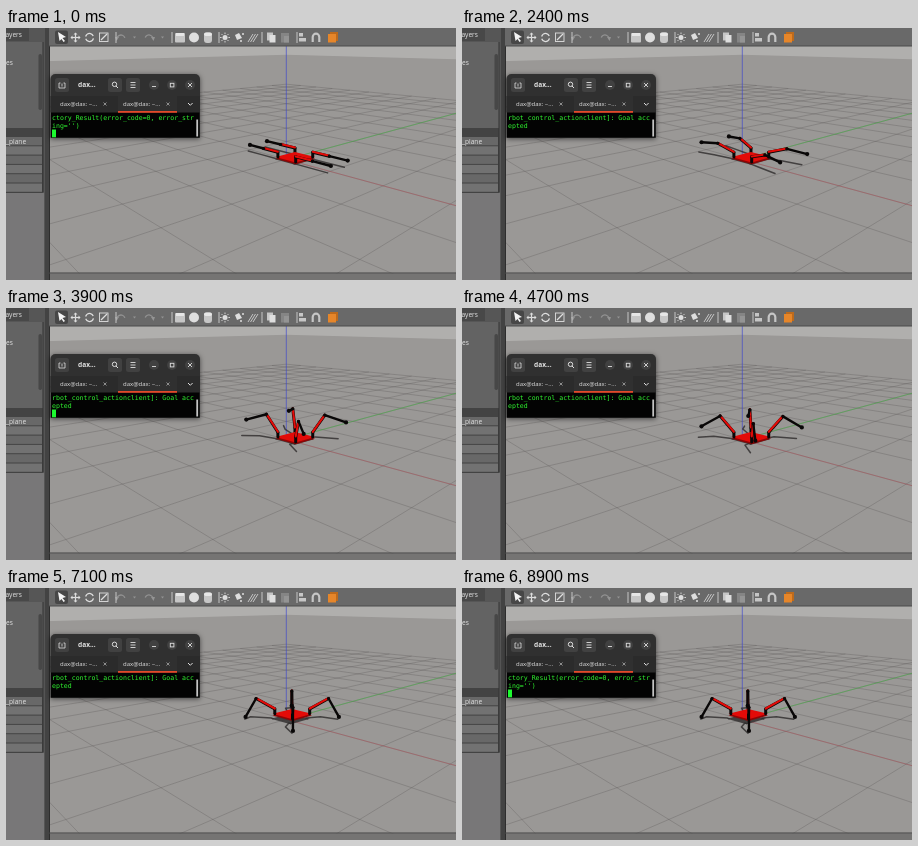
Recreate the animation shown at these times as an HTML page with a canvas. Size 450 by 252 pixels, loop 9000 ms.

```html
<!DOCTYPE html>
<html lang="en">
<head>
<meta charset="utf-8">
<title>Robot simulation</title>
<style>
html, body { margin: 0; width: 100%; height: 100%; overflow: hidden; background: #9a9896; }
#stage { position: relative; width: 450px; height: 252px; overflow: hidden; }
canvas { position: absolute; left: 0; top: 0; }
#stage span { position: absolute; white-space: pre; color: #e4e4e4; font: 6.6px/8px "Open Sans", "Noto Sans", sans-serif; }
#stage .title { font-weight: 700; }
#stage .tab { font-size: 6px; top: 72px; }
#stage .term { left: 46px; color: #30f830; font: 6.55px/8px "DejaVu Sans Mono", monospace; }
</style>
</head>
<body>
<div id="stage">
  <canvas id="view" width="450" height="252"></canvas>
  <span style="left:-4px;top:3px">Layers</span>
  <span style="left:0;top:31px">es</span>
  <span style="left:0;top:110px">_plane</span>
  <span class="title" style="left:72px;top:53px">dax...</span>
  <span class="tab" style="left:54px">dax@dax: ~...</span>
  <span class="tab" style="left:117px">dax@dax: ~...</span>
  <span class="term" id="row1" style="top:86px"></span>
  <span class="term" id="row2" style="top:94px"></span>
</div>
<script>
const ctx = document.getElementById("view").getContext("2d");
const rows = [document.getElementById("row1"), document.getElementById("row2")];
const LOOP = 9000, STEP = 100;

function rect(c, x, y, w, h) { ctx.fillStyle = c; ctx.fillRect(x, y, w, h); }

function round(c, x, y, w, h, r) {
  ctx.fillStyle = c;
  ctx.beginPath();
  ctx.roundRect(x, y, w, h, r);
  ctx.fill();
}

function line(c, w, ...p) {
  ctx.strokeStyle = c;
  ctx.lineWidth = w;
  ctx.beginPath();
  for (let i = 0; i < p.length; i += 2) ctx.lineTo(p[i], p[i + 1]);
  ctx.stroke();
}

function poly(c, ...p) {
  ctx.fillStyle = c;
  ctx.beginPath();
  for (let i = 0; i < p.length; i += 2) ctx.lineTo(p[i], p[i + 1]);
  ctx.fill();
}

function dot(c, x, y, r) {
  ctx.fillStyle = c;
  ctx.beginPath();
  ctx.arc(x, y, r, 0, 7);
  ctx.fill();
}

function ring(c, w, x, y, r, from = 0, to = 7) {
  ctx.strokeStyle = c;
  ctx.lineWidth = w;
  ctx.beginPath();
  ctx.arc(x, y, r, from, to);
  ctx.stroke();
}

const mix = (a, b, k) => a.map((v, i) => v + (b[i] - v) * k);

// Camera at (5, -5, 2) looking at the world origin
const FOCAL = 410, CX = 280.3, CY = 131.5, NEAR = 0.2;
function toCamera([x, y, z]) {
  const a = x - 5, b = y + 5, c = z - 2;
  return [0.7071 * (a + b), 0.1925 * (b - a) + 0.9623 * c, 0.6804 * (b - a) - 0.2722 * c];
}
const toScreen = ([r, u, d]) => [CX + FOCAL * r / d, CY - FOCAL * u / d];
const project = p => toScreen(toCamera(p));

function worldLine(color, width, p, q) {
  let [a, b] = [toCamera(p), toCamera(q)].sort((m, n) => n[2] - m[2]);
  if (a[2] < NEAR) return;
  if (b[2] < NEAR) b = mix(a, b, (a[2] - NEAR) / (a[2] - b[2]));
  line(color, width, ...toScreen(a), ...toScreen(b));
}

function drawWorld() {
  rect("#b0afad", 43, 18, 407, 30);
  const edge = [[-50, 0, 0], [-50, 50, 0], [0, 50, 0]].flatMap(project);
  poly("#9a9896", ...edge, 520, 246, -70, 246);
  const grid = "rgba(82,80,79,.44)";
  for (let i = -10; i <= 10; i++) {
    worldLine(grid, 0.65, [i, -10, 0], [i, 10, 0]);
    worldLine(grid, 0.65, [-10, i, 0], [10, i, 0]);
  }
  worldLine("rgba(190,70,80,.55)", 0.7, [0, 0, 0], [4.9, 0, 0]);
  worldLine("rgba(60,185,60,.6)", 0.8, [0, 0, 0], [0, 10, 0]);
  line("rgba(62,70,205,.75)", 0.9, CX, 18, CX, CY);
}

function drawPanel() {
  rect("#565656", 0, 0, 44, 252);
  rect("#484848", 0, 0, 23, 13);
  rect("#636363", 0, 14, 37, 86);
  round("#474747", 32.5, 26, 3.5, 56, 1.7);
  rect("#434343", 0, 100, 37, 65);
  for (let i = 0; i < 6; i++) rect(i % 2 ? "#727272" : "#686868", 0, 109 + i * 9.3, 36, 8.3);
  rect("#787778", 0, 165, 38, 87);
  rect("#343434", 36.5, 14, 1, 150);
  rect("#434343", 39, 0, 4, 252);
  rect("#2d2d2d", 43, 18, 1, 234);
}

function drawToolbar() {
  const pale = "#dedede", mid = "#c6c6c6", dim = "#949494", y = 9.5;
  rect("#696969", 43, 0, 407, 18);
  rect("#4d4d4d", 43, 17.5, 407, 1);
  round("#474747", 49, 2.5, 13, 13.5, 2);
  poly("#f4f4f4", 52, 4, 60, 9, 56.5, 10, 59, 13, 57.5, 14, 55.5, 11, 53.5, 13);
  for (let i = 0; i < 4; i++) {
    ctx.save();
    ctx.translate(69.5, y);
    ctx.rotate(i * Math.PI / 2);
    line(pale, 1.2, 0, 0, 4, 0);
    poly(pale, 5, 0, 3, -2, 3, 2);
    ctx.restore();
  }
  ring(pale, 1.3, 83.5, y, 4, 0.2, 2.8);
  ring(pale, 1.3, 83.5, y, 4, 3.4, 5.9);
  ctx.strokeStyle = pale;
  ctx.lineWidth = 0.9;
  ctx.strokeRect(93.5, 5, 8.5, 8.5);
  line(pale, 1.3, 95, 12, 101, 6);
  for (const [x, s] of [[115, 1], [143, -1]]) {
    ring(dim, 1.3, x, 11, 4, 3.5, 6);
    poly(dim, x - s * 6, 9, x - s * 2, 9, x - s * 4.5, 13);
    poly(dim, x + 12, 8.5, x + 15, 8.5, x + 13.5, 10.5);
  }
  for (const x of [110, 166, 213, 256, 291]) rect(mid, x - 0.5, 4, 1, 11);
  round(mid, 169, 5, 10, 9.5, 1);
  rect("#e6e6e6", 170, 5, 8, 3);
  dot(pale, 188, y, 5);
  round(mid, 198, 4.5, 8, 10.5, 3);
  round("#e6e6e6", 198, 4.5, 8, 3.5, 2);
  dot(pale, 219, y, 2.5);
  for (let i = 0; i < 8; i++) {
    const c = Math.cos(i * Math.PI / 4), s = Math.sin(i * Math.PI / 4);
    line(pale, 0.9, 219 + 3.4 * c, y + 3.4 * s, 219 + 5 * c, y + 5 * s);
  }
  poly(pale, 229, 7, 233, 5, 236, 10, 231, 12);
  dot(pale, 237, 6, 1);
  dot(pale, 235, 13, 1);
  for (let i = 0; i < 3; i++) line(mid, 1, 242 + i * 2.5, 14, 247 + i * 2.5, 6);
  rect(mid, 261, 4.5, 6, 8);
  rect(pale, 263.5, 7, 6, 7.5);
  rect("#858585", 275, 5, 8, 9.5);
  rect(dim, 278, 8, 5, 6.5);
  rect(mid, 293, 5, 4, 3.5);
  rect(mid, 293, 10, 7, 3.5);
  ring(mid, 2.2, 310, 9, 3.3, Math.PI, 2 * Math.PI);
  for (const x of [306.7, 313.3]) line(mid, 2.2, x, 9, x, 14);
  rect("#bd6a1c", 324, 4, 8, 9);
  rect("#e6862a", 322, 6, 8, 8.5);
}

function cross(x, y, r, c) {
  line(c, 0.9, x - r, y - r, x + r, y + r);
  line(c, 0.9, x + r, y - r, x - r, y + r);
}

function drawTerminal(cursor) {
  const fg = "#dedede";
  ctx.save();
  ctx.shadowColor = "rgba(0,0,0,.55)";
  ctx.shadowBlur = 5;
  ctx.shadowOffsetY = 1;
  round("#303030", 44.5, 46, 149.5, 64, [5, 5, 1, 1]);
  ctx.restore();
  rect("#2b2b2b", 44.5, 68, 149.5, 16.5);
  rect("#303030", 112, 68, 59, 15);
  rect("#030303", 45, 84.5, 148.5, 25);
  rect("#e2492a", 112, 83, 59, 1.8);
  for (const x of [49, 102, 120]) round("#414141", x, 50, 14, 14, 2.5);
  for (const x of [148, 166, 184]) dot("#414141", x, 57, 5);
  line(fg, 0.8, 54.5, 55, 53, 55, 53, 60, 59, 60, 59, 55, 57.5, 55);
  line(fg, 0.8, 56, 58.5, 56, 55.5);
  ring(fg, 1, 108.5, 56.3, 2.2);
  line(fg, 1, 110, 58, 112, 60);
  for (const y of [54.5, 57, 59.5]) line(fg, 0.9, 124.5, y, 129.5, y);
  line(fg, 0.9, 146, 58.5, 150, 58.5);
  ctx.strokeRect(164.3, 55.3, 3.6, 3.6);
  cross(184, 57, 2, fg);
  for (const x of [99, 162]) cross(x, 76, 1.5, "#999");
  line(fg, 1, 182, 75, 184.3, 77.3, 186.6, 75);
  rect("#c5c5c5", 190.3, 91.5, 1.8, 17);
  if (cursor) rect("#1dfa30", 46, 101.5, 4, 7.8);
}

// Time, then hip yaw, thigh pitch and shin pitch in degrees, body offset and body height
const keys = [
  [0, 0, 0, 0, 0.114, 0.045],
  [1800, 0, 0, 0, 0.114, 0.045],
  [3100, 22, 38, -11, 0.114, 0.045],
  [3900, 34, 57, -17, 0.114, 0.045],
  [5200, 45, 46, -38, 0.114, 0.045],
  [5700, 45, 46, -38, 0.114, 0.045],
  [6400, 45, 30, -60, 0.075, 0.105],
  [LOOP, 45, 30, -60, 0.075, 0.105]
];

function poseAt(t) {
  const i = keys.findIndex(k => k[0] > t);
  const a = keys[i - 1], b = keys[i];
  return mix(a, b, (t - a[0]) / (b[0] - a[0])).slice(1);
}

const RED = "#e30b08", BLACK = "#090707", SHADE = "rgba(45,43,43,.8)";
const THIGH = 0.38, SHIN = 0.39, HALF = 0.25, HIP = 0.22, POST = 0.09;
const rad = d => d * Math.PI / 180;
const shadow = ([x, y, z]) => project([x - 0.5 * z / 0.9, y + 0.1 * z / 0.9, 0]);

function reach([x, y, z], yaw, pitch, len) {
  const flat = len * Math.cos(pitch);
  return [x + flat * Math.cos(yaw), y + flat * Math.sin(yaw), z + len * Math.sin(pitch)];
}

// sx, sy pick the body corner the leg grows from
function makeLeg(sx, sy, [yaw, thigh, shin, c, z]) {
  const turn = Math.atan2(sy * Math.sin(rad(yaw)), sx * Math.cos(rad(yaw)));
  const base = [c + sx * HIP, c + sy * HIP, z];
  const hip = [base[0], base[1], z + POST];
  const knee = reach(hip, turn, rad(thigh), THIGH);
  return [base, hip, knee, reach(knee, turn, rad(shin), SHIN)];
}

function drawLeg(leg) {
  const [base, hip, knee, foot] = leg.map(project);
  line(BLACK, 3, ...base, ...hip);
  line(BLACK, 3, ...hip, ...knee);
  line(RED, 2.1, hip[0], hip[1] - 0.4, knee[0], knee[1] - 0.4);
  line(BLACK, 2.4, ...knee, ...foot);
  dot(BLACK, ...knee, 1.6);
  dot(BLACK, ...foot, 2.1);
}

function drawRobot(pose) {
  const [, , , c, z] = pose;
  const corners = [[-1, -1], [-1, 1], [1, 1], [1, -1]];
  const legs = corners.map(([sx, sy]) => makeLeg(sx, sy, pose));
  const plate = h => corners.map(([sx, sy]) => [c + sx * HALF, c + sy * HALF, h]);
  const [left, back, right, front] = legs;
  ctx.lineCap = ctx.lineJoin = "round";
  poly(SHADE, ...plate(z).flatMap(shadow));
  for (const leg of legs) line(SHADE, 1.5, ...leg.flatMap(shadow));
  drawLeg(back);
  poly("#8e0505", ...plate(z - 0.03).flatMap(project));
  poly(RED, ...plate(z).flatMap(project));
  [left, right, front].forEach(drawLeg);
  ctx.lineCap = "butt";
  ctx.lineJoin = "miter";
}

const RESULT = ["ctory_Result(error_code=0, error_str", "ing='')"];
const ANGLES = ["-60.88084274376154", "82.8192442105417"];
const GOAL = ["rbot_control_actionclient]: Goal acc", "epted"];

function linesAt(t) {
  if (t < 300 || t >= 7600) return RESULT;
  return t < 1900 ? ANGLES : GOAL;
}

const cursorAt = t => Math.floor(Math.max(t - 155, 0) / 590) % 2 === 0;

function draw(now) {
  const t = Math.floor(now % LOOP / STEP) * STEP;
  drawWorld();
  drawRobot(poseAt(t));
  drawPanel();
  drawToolbar();
  rect("#444", 43, 244.5, 407, 1.2);
  rect("#757473", 44, 245.7, 406, 6.3);
  drawTerminal(cursorAt(t));
  linesAt(t).forEach((s, i) => {
    if (rows[i].textContent !== s) rows[i].textContent = s;
  });
}

const start = performance.now();
function tick() {
  draw(performance.now() - start);
  requestAnimationFrame(tick);
}
tick();
</script>
</body>
</html>
```
